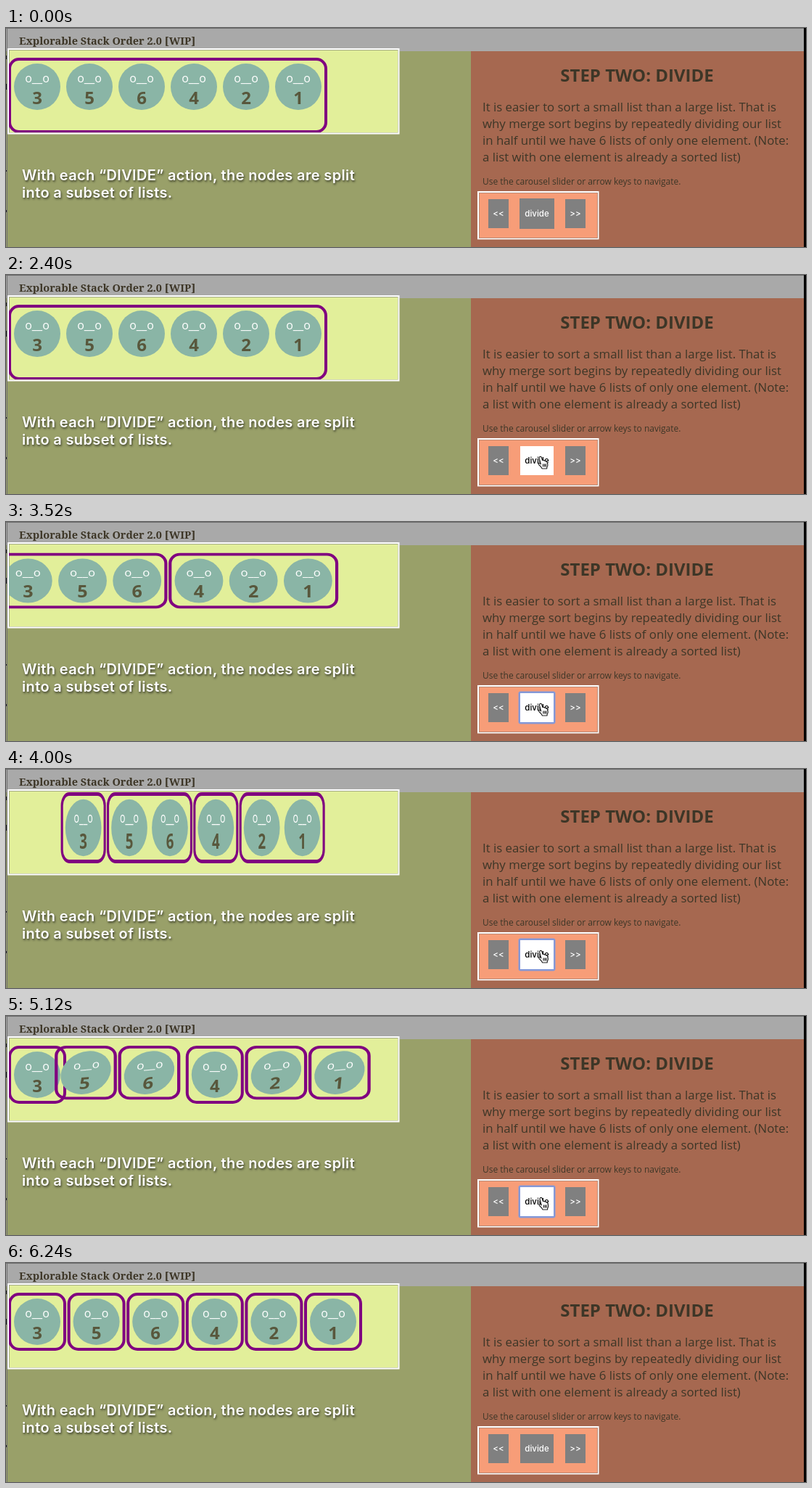
An HTML page for the animation above (6.4 s loop, 1103x302 px).

```html
<!DOCTYPE html>
<html lang="en">
<head>
<meta charset="utf-8">
<title>Dividing a list</title>
<style>
  html, body { margin: 0; width: 100%; height: 100%; overflow: hidden; background: #000; }
  svg { display: block; width: 1103px; height: 302px; font-family: "Open Sans", sans-serif; }
  .ink { fill: #3d3627; }
  .title { font: bold 14.5px "Noto Serif", serif; }
  .head { font-size: 24px; font-weight: bold; text-anchor: middle; }
  .body { font-size: 16.8px; }
  .note { font-size: 12px; }
  .caption { font: 600 20px Inter, sans-serif; letter-spacing: .35px; fill: #fff; text-shadow: 1px 2px 3px #0009; }
  .btn { font: 500 11.5px Inter, sans-serif; text-anchor: middle; fill: #fff; }
  .list { fill: none; stroke: #800080; stroke-width: 4; }
  .node { fill: #8ab5a6; }
  .eyes { font-size: 16px; text-anchor: middle; fill: #fff; }
  .num { font-size: 24px; font-weight: bold; text-anchor: middle; fill: #58573c; }
</style>
</head>
<body>
<svg viewBox="0 0 1103 302">
  <clipPath id="clip"><rect x="4" y="31" width="536" height="113"/></clipPath>
  <rect width="1100" height="32" fill="#a9a9a9"/>
  <rect y="32" width="641" height="270" fill="#99a069"/>
  <rect x="641" y="32" width="459" height="270" fill="#a66850"/>
  <path d="M0 .5H1100M1.5 0V302" stroke="#707070"/>
  <path d="M.5 38v5M.5 77v8M.5 196v2M.5 251v3" stroke="#222"/>

  <text class="ink title" x="18" y="23">Explorable Stack Order 2.0 [WIP]</text>
  <text class="ink head" x="870" y="74">STEP TWO: DIVIDE</text>
  <g class="ink body">
    <text x="657" y="115">It is easier to sort a small list than a large list. That is</text>
    <text x="657" y="138">why merge sort begins by repeatedly dividing our list</text>
    <text x="657" y="161">in half until we have 6 lists of only one element. (Note:</text>
    <text x="657" y="184">a list with one element is already a sorted list)</text>
  </g>
  <text class="ink note" x="657" y="216">Use the carousel slider or arrow keys to navigate.</text>
  <g class="caption">
    <text x="22" y="210">With each “DIVIDE” action, the nodes are split</text>
    <text x="22" y="234">into a subset of lists.</text>
  </g>

  <rect x="3" y="29" width="538" height="116" fill="#e2ef9a"/>
  <rect x="4.5" y="30.5" width="536" height="114" fill="none" stroke="#a5aa86"/>
  <g id="lists" clip-path="url(#clip)"></g>
  <rect x="3" y="29" width="538.5" height="116.5" fill="none" stroke="#fff" stroke-width="2"/>

  <rect x="651" y="226" width="165.500" height="64.500" fill="#f79d78" stroke="#fff" stroke-width="2"/>
  <rect x="652.5" y="227.5" width="163" height="62" fill="none" stroke="#b98a76"/>
  <path d="M665 236h28v40h-28zM771 236h28v40h-28z" fill="#808080"/>
  <rect id="ring" x="706.500" y="233.500" width="51" height="45" rx="3" fill="#8499d8"/>
  <rect id="button" x="709" y="236" width="46" height="40"/>
  <g class="btn">
    <text x="679" y="260">&lt;&lt;</text>
    <text id="label" x="732" y="260">divide</text>
    <text x="785" y="260">&gt;&gt;</text>
  </g>
  <path id="hand" fill="#fff" stroke="#222" stroke-width="1.2" stroke-linejoin="round"
    d="M3 1.500q1.700-.6 2.300 1l1.200 4q1.800-.6 2.400.6 1.600-.5 2.200.8 1.800 0 2 1.600l.7 3q.2 2-1 3.500l-.2 2h-6.500q-1.600-3-4-5-1.700-1.600-.6-2.400 1.200-.7 2.800 1.200l-2.200-8q-.2-1.700.9-2.300zM7.500 11.500v4M9.500 11.500v4M11.300 11.500v4"/>
</svg>
<script>
const LOOP = 6400, CENTER = 328, GAP = 1.6;
const VALUES = [3, 5, 6, 4, 2, 1];
const STEPS = [
  { at: 0, sizes: [6], height: 104 },
  { at: 2720, sizes: [3, 3], originY: 81 },
  { at: 3615, sizes: [1, 2, 1, 2], originY: 81 },
  { at: 4557, sizes: [1, 1, 1, 1, 1, 1], originY: 41, still: [0, 3], tilts: true }
];
const STRETCH = [[0, 1], [.3, 1.25], [.4, .75], [.5, 1.15], [.65, .95], [.75, 1.05], [1, 1]];
const TILT = [[.3, 0], [.4, -6], [.563, -5], [.65, 3], [.75, -1.5], [1, 0]];
const HAND_X = [[700, 692], [1280, 721], [2000, 733], [5750, 734], [6120, 744]];
const HAND_Y = [[700, 304], [1280, 242], [2000, 249], [5750, 249], [6120, 304]];
const HOVER = [[1200, 0], [1600, 1], [5900, 1], [6200, 0]];
const RING = [[2720, 0], [2760, 1], [5900, 1], [6100, 0]];

const el = id => document.getElementById(id);

// Eased value at t on a list of [time, value] keys
function track(keys, t) {
  const i = keys.findIndex(k => k[0] > t);
  if (i === 0) return keys[0][1];
  if (i < 0) return keys[keys.length - 1][1];
  const [t0, a] = keys[i - 1], [t1, b] = keys[i];
  const p = (t - t0) / (t1 - t0);
  return a + (b - a) * p * p * (3 - 2 * p);
}

function node(value, x, tilt) {
  return `<g transform="translate(${x} 81) skewX(${tilt}) skewY(${tilt})">
    <circle class="node" r="32"/>
    <text class="eyes" y="-6">o__o</text>
    <text class="num" y="24">${value}</text></g>`;
}

function drawLists(t) {
  const step = STEPS.filter(s => s.at <= t).pop();
  const phase = (t - step.at) / 1000;
  const sx = step.at ? track(STRETCH, phase) : 1;
  const tilt = step.tilts ? track(TILT, phase) : 0;
  const oy = step.originY || 0;
  const scale = `translate(${CENTER} ${oy}) scale(${sx} ${2 - sx}) translate(${-CENTER} ${-oy})`;
  let x = 3, first = 0;
  el("lists").innerHTML = step.sizes.map((size, i) => {
    const width = size * 72 + 8, left = x;
    const moves = !(step.still || []).includes(i);
    const nodes = VALUES.slice(first, first + size)
      .map((v, k) => node(v, left + 40 + k * 72, moves ? tilt : 0)).join("");
    x += width + GAP;
    first += size;
    return `<g transform="${moves ? scale : ""}">
      <rect class="list" x="${left + 2}" y="43" width="${width - 4}" height="${(step.height || 80) - 4}" rx="13"/>
      ${nodes}</g>`;
  }).join("");
}

function drawButton(t) {
  const hover = track(HOVER, t);
  const bg = 128 + 127 * hover, ink = 255 * (1 - hover);
  const pad = t < 160 ? 1 : 0;
  const button = el("button");
  button.setAttribute("fill", `rgb(${bg},${bg},${bg})`);
  button.setAttribute("stroke", pad ? "#808080" : "none");
  button.setAttribute("stroke-width", pad * 2);
  el("label").style.fill = `rgb(${ink},${ink},${ink})`;
  el("ring").setAttribute("opacity", track(RING, t));
  el("hand").setAttribute("transform", `translate(${track(HAND_X, t)} ${track(HAND_Y, t)})`);
}

function frame() {
  const t = performance.now() % LOOP;
  drawLists(t);
  drawButton(t);
  requestAnimationFrame(frame);
}
frame();
</script>
</body>
</html>
```
